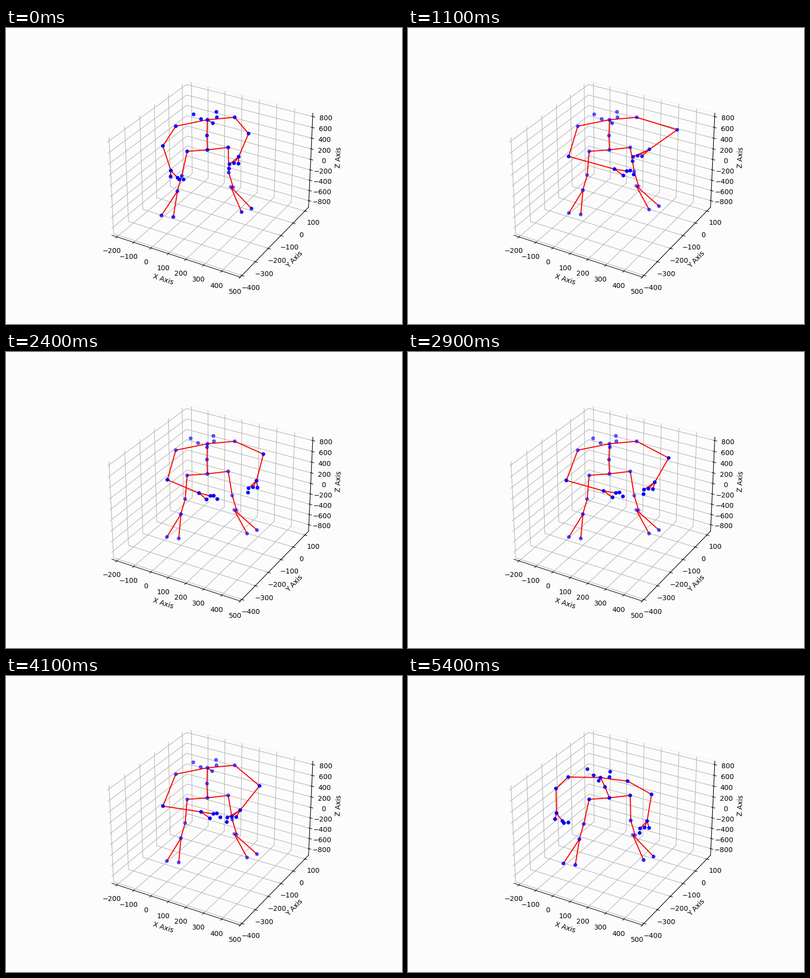
These frames come from a looping animation (800 px wide and 600 px high, 5500 ms). A matplotlib script:

```python
import numpy as np
import matplotlib.pyplot as plt
from matplotlib.animation import FuncAnimation
from matplotlib.collections import LineCollection

FRAMES = 55
PAPER = "#fcfcfc"

# Standing body in screen pixels
BODY = {
    "head": [(376, 175), (422, 170), (391, 184.5), (423, 181)],
    "nose": [(412, 193)], "chest": [(407, 186)],
    "spine": [(406, 218)], "pelvis": [(407, 247)],
    "shoulder": [(343, 199), (462, 181)], "hip": [(366, 250), (449, 242)],
    "knee": [(362, 298), (457, 291)], "ankle": [(353, 329), (466, 321)],
    "heel": [(353.5, 328.5), (461, 320)],
    "left toes": [(325, 375), (349, 378)], "right toes": [(487, 368), (507, 361)],
}

# Arm gestures: time, then elbow x, y and wrist x, y
BEATS = [0, 7, 16, 24, 35, 46, 54]
LEFT_ARM = [(317, 239, 333, 289), (343, 262, 439, 296), (332, 258, 403, 272),
            (326, 259, 390, 286), (344, 262, 418, 276), (321, 265, 388, 275),
            (299, 228, 300, 278)]
RIGHT_ARM = [(490, 214, 470, 261), (499, 201, 465, 236), (536, 214, 484, 260),
             (520, 207, 506, 261), (510, 225, 476, 268), (504, 221, 466, 275),
             (492, 240, 483, 294)]

# Hand points relative to the wrist
LEFT_HANGING = np.array([(-3, 12), (12, 16), (15, 20), (24, 19)])
LEFT_REACHING = np.array([(18, 13), (25, 4), (32, 3), (39, 11)])
RIGHT_HAND = np.array([(-4, 14), (-13, 13), (-22, 15), (-23, 24)])


def smooth(t):
    t = np.clip(t, 0, 1)
    return t * t * (3 - 2 * t)


def arm_at(frame, gestures, swing):
    """Elbow and wrist, with the elbow swinging out between two gestures."""
    beat = min(np.searchsorted(BEATS, frame, side="right"), len(BEATS) - 1)
    t = (frame - BEATS[beat - 1]) / (BEATS[beat] - BEATS[beat - 1])
    start, end = np.array(gestures[beat - 1:beat + 1], float)
    elbow, wrist = (start + (end - start) * smooth(t)).reshape(2, 2)
    out = swing * np.sin(np.pi * t)
    return elbow + (out, 0), wrist + (out / 2, 0)


def turn_about(points, centre, angle):
    c, s = np.cos(angle), np.sin(angle)
    return (points - centre) @ np.array([(c, s), (-s, c)]) + centre


def body_at(frame, hang, bow):
    body = {name: np.array(points, float) for name, points in BODY.items()}
    turn = 3 * np.cos(2 * np.pi * frame / 46)
    body["head"] += (turn, 0)
    body["nose"] += (2 * turn - 10 * bow, 0)
    for name in ("head", "nose", "shoulder"):
        body[name] = turn_about(body[name], body["chest"][0], .22 * bow)
    for name in ("head", "nose", "shoulder", "chest"):
        body[name] += (-18 * bow, 20 * bow)
    body["spine"] += (-8 * bow, 7 * bow)
    for name in ("knee", "ankle", "heel"):
        body[name] += (-7 * hang, 2 * hang)
    for name in ("left toes", "right toes"):
        body[name] += (-11 * hang, 5 * hang)
    return body


def pose_at(frame):
    """Bone segments, joint positions and joint opacities."""
    hang = np.clip(max(1 - frame / 6, (frame - 47) / 6), 0, 1)
    bow = smooth((frame - 47) / 7)
    body = body_at(frame, hang, bow)

    arms = [arm_at(frame, LEFT_ARM, -14),
            arm_at(frame, RIGHT_ARM, 55 * np.exp(-frame / 18))]
    (l_elbow, l_wrist), (r_elbow, r_wrist) = arms
    stretch = np.clip((l_wrist[0] - l_elbow[0] - 8) / 65, 0, 1)
    l_hand = l_wrist + LEFT_HANGING + stretch * (LEFT_REACHING - LEFT_HANGING)
    r_hand = r_wrist + RIGHT_HAND + (.4 * (r_wrist[0] - r_elbow[0] + 29), 0)

    chest, pelvis = body["chest"][0], body["pelvis"][0]
    chains = [[pelvis, body["spine"][0], chest, body["nose"][0]]]
    sides = zip(arms, (l_hand[:2], r_hand[:3]), (body["left toes"], body["right toes"]))
    for side, ((elbow, wrist), fingers, toes) in enumerate(sides):
        heel = body["heel"][side]
        chains.append([chest, body["shoulder"][side], elbow, wrist])
        chains.append([pelvis, body["hip"][side], body["knee"][side],
                       body["ankle"][side], heel])
        chains += [[wrist, finger] for finger in fingers]
        chains += [[heel, toe] for toe in toes]

    # Farther joints are fainter
    shade = dict.fromkeys(body, .6 + .27 * hang)
    shade["knee"] = .52 + .18 * hang
    shade["ankle"] = shade["heel"] = .4 + .05 * hang
    shade["left toes"] = shade["right toes"] = .6 + .18 * hang
    near = np.interp(r_wrist[1], [236, 262], [.65, 1])
    groups = [(points, shade[name]) for name, points in body.items()]
    groups += [([l_elbow], .92), ([l_wrist], 1), (l_hand, 1),
               ([r_elbow], .88 * near), ([r_wrist], .95 * near), (r_hand, near)]
    joints = np.vstack([points for points, _ in groups])
    alpha = np.concatenate([[a] * len(points) for points, a in groups])
    return chains, joints, alpha


fig = plt.figure(figsize=(8, 6), dpi=100, facecolor=PAPER)

box = fig.add_subplot(projection="3d", facecolor=PAPER)
box.set(xticks=range(-200, 501, 100), yticks=range(-400, 101, 100),
        zticks=range(-800, 801, 200))
box.set(xlim=(-230.5, 500.5), ylim=(-411.4, 131.5), zlim=(-930, 862),
        xlabel="X Axis", ylabel="Y Axis", zlabel="Z Axis")
for axis, edge in ((box.xaxis, PAPER), (box.yaxis, "#ececec"), (box.zaxis, "#f2f2f2")):
    axis.pane.set_facecolor(PAPER)
    axis.pane.set_edgecolor(edge)

# The skeleton is drawn in screen pixels above the box
screen = fig.add_axes([0, 0, 1, 1])
screen.set(xlim=(0, 800), ylim=(600, 0))
screen.axis("off")
bones = LineCollection([], colors="red", linewidths=1.5, capstyle="projecting", zorder=2)
screen.add_collection(bones, autolim=False)
dots = screen.scatter([0], [0], s=20, c="blue", zorder=3)


def update(frame):
    chains, joints, alpha = pose_at(frame)
    bones.set_segments(chains)
    order = np.argsort(alpha, kind="stable")
    dots.set_offsets(joints[order])
    dots.set_facecolor([(0, 0, 1, a) for a in alpha[order]])
    return bones, dots


anim = FuncAnimation(fig, update, frames=FRAMES, interval=100, repeat=True,
                     repeat_delay=0, blit=False)
plt.show()
```
